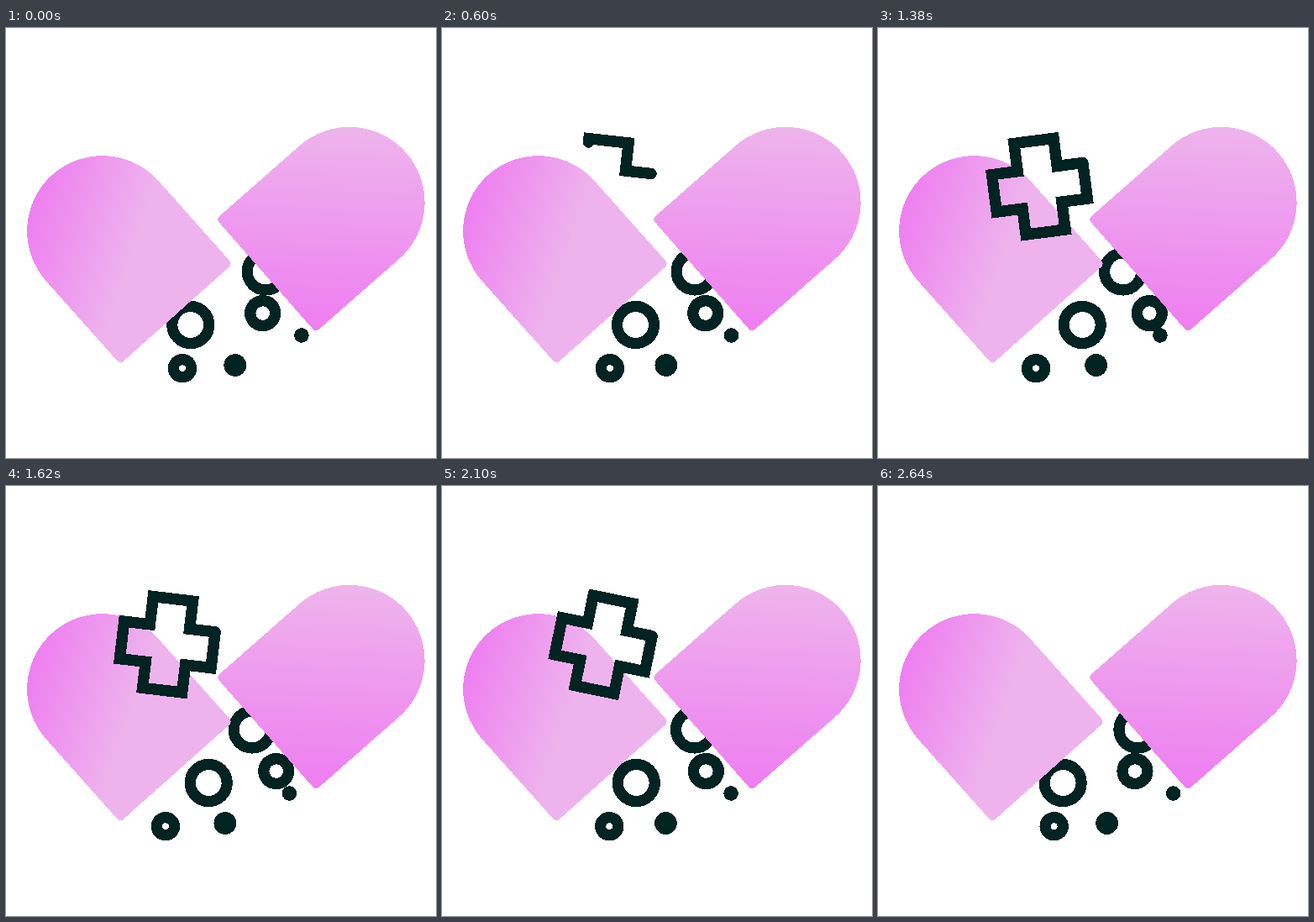
These frames come from a looping animation (512x512 px, 2.67 s). An HTML page:

```html
<!DOCTYPE html>
<html lang="en">
<head>
<meta charset="utf-8">
<title>Capsule</title>
<style>
  html, body { margin: 0; width: 100%; height: 100%; overflow: hidden; background: #fff; }
  svg { display: block; width: 100%; height: 100%; shape-rendering: crispEdges; }
</style>
</head>
<body>
<svg viewBox="0 0 512 512" xmlns="http://www.w3.org/2000/svg">
  <defs>
    <linearGradient id="leftFill" gradientUnits="userSpaceOnUse" x1="30" y1="222" x2="153" y2="263">
      <stop offset="0" stop-color="#ee80f0"/>
      <stop offset="1" stop-color="#eeb3ed"/>
    </linearGradient>
    <linearGradient id="rightFill" gradientUnits="userSpaceOnUse" x1="394" y1="118" x2="384" y2="358">
      <stop offset="0" stop-color="#eeb4ec"/>
      <stop offset="1" stop-color="#ee7ef1"/>
    </linearGradient>
  </defs>
  <g id="beads"></g>
  <path id="left" fill="url(#leftFill)"/>
  <path id="right" fill="url(#rightFill)"/>
  <path id="cross" fill="none" stroke="#012322" stroke-width="13.4" stroke-linecap="round" stroke-miterlimit="10"
    d="M54.5-21.4H23.7V-54.7H-23.8V-21.2H-54.7V23.6H-23.6V54.8H23.8V21.6H54.5V-21.4"/>
</svg>
<script>
const STEP = 30, COUNT = 89, INK = '#012322';
const $ = id => document.getElementById(id);

// Half capsule: round end centred at (cx, cy), flat base at distance len along the axis.
function half(cx, cy, r, len, deg) {
  const a = deg * Math.PI / 180, c = Math.cos(a), s = Math.sin(a), k = 5;
  const p = (x, y) => `${(cx + x * c - y * s).toFixed(2)} ${(cy + x * s + y * c).toFixed(2)}`;
  return `M${p(0, r)}A${r} ${r} 0 0 1 ${p(0, -r)}L${p(len - k, -r)}` +
    `A${k} ${k} 0 0 1 ${p(len, -r + k)}L${p(len, r - k)}A${k} ${k} 0 0 1 ${p(len - k, r)}Z`;
}
$('left').setAttribute('d', half(114.3, 241.3, 89.6, 133, 48.3));
$('right').setAttribute('d', half(409, 207.4, 89.7, 132.5, 138.7));

// Beads: x, y, outer radius, hole radius, sideways travel
const beads = [
  [219.8, 353.5, 28.6, 15.4, 23.5],
  [309.2, 290, 28.6, 15.4, -17.6],
  [305.7, 339.6, 21.6, 8.3, 17.6],
  [351.9, 366, 8.8, 0, -16],
  [210, 405.2, 17.2, 3.9, -22],
  [272.8, 401.5, 13.4, 0, -13.1]
].map(([x, y, outer, hole, dx]) => {
  const el = document.createElementNS('http://www.w3.org/2000/svg', 'circle');
  const ring = hole > 0;
  const attrs = {
    cx: x, cy: y, r: ring ? (outer + hole) / 2 : outer,
    fill: ring ? 'none' : INK,
    stroke: ring ? INK : 'none', 'stroke-width': outer - hole
  };
  for (const n in attrs) el.setAttribute(n, attrs[n]);
  $('beads').append(el);
  return { el, x, dx };
});

const clamp = u => Math.min(1, Math.max(0, u));
const smooth = (k, a, b) => { const u = clamp((k - a) / (b - a)); return u * u * (3 - 2 * u); };

// Eases to a stop at 1, leaving 0 with the given slope.
const settle = (u, slope) => u * u * (3 - 2 * u) + slope * u * (1 - u) * (1 - u);
const drift = k => k < 45 ? settle(k / 45, 0.3) : settle((COUNT - k) / 44, 0.65);

const tilt = k => 6.5
  - 18.5 * smooth(k, 19, 40.5)
  + 24.7 * smooth(k, 40.5, 60.3)
  - 6.2 * smooth(k, 63, 89);

const cross = $('cross'), length = cross.getTotalLength();

function draw(ms) {
  const k = Math.floor(ms / STEP) % COUNT;
  const d = drift(k);
  for (const b of beads) b.el.setAttribute('cx', (b.x + b.dx * d).toFixed(2));
  const shown = smooth(k, 14.8, 30.2) * (1 - smooth(k, 73, 87));
  cross.setAttribute('visibility', shown > 0.002 ? 'visible' : 'hidden');
  cross.setAttribute('stroke-dasharray', `${(length * shown).toFixed(2)} 2000`);
  cross.setAttribute('transform', `translate(192.5 188.7) rotate(${tilt(k).toFixed(2)})`);
}

const start = performance.now();
function tick() {
  draw(performance.now() - start);
  requestAnimationFrame(tick);
}
tick();
</script>
</body>
</html>
```
